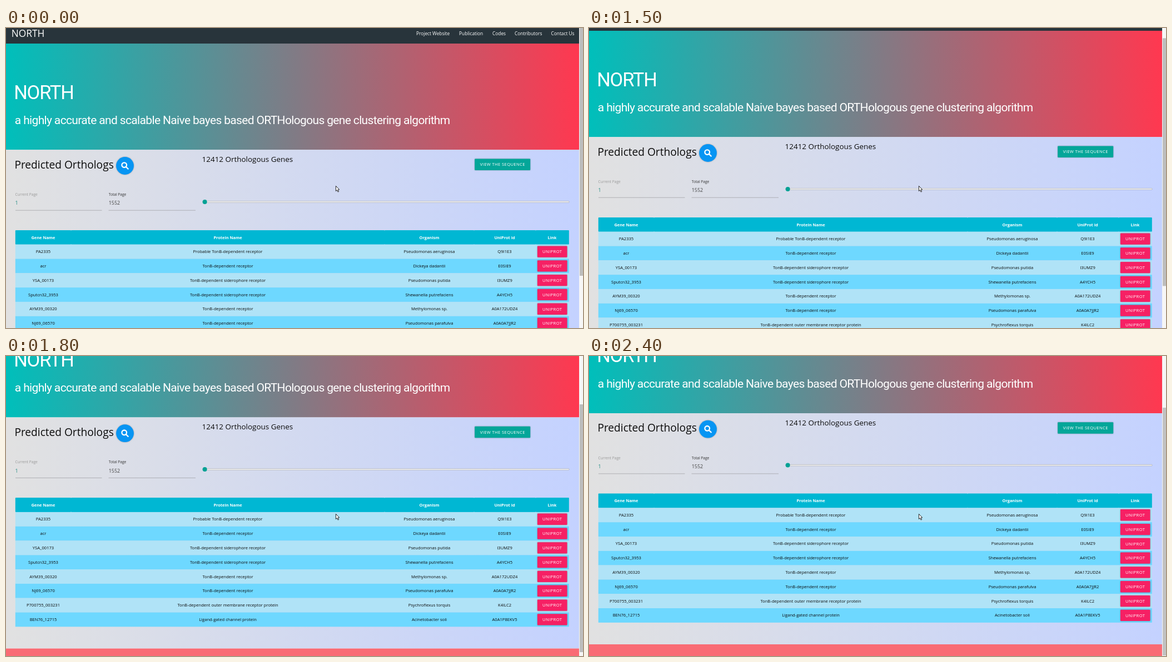
These frames come from a looping animation (1038 by 540 pixels, 2500 ms). An HTML page:

```html
<!DOCTYPE html>
<html lang="en">
<head>
<meta charset="utf-8">
<title>NORTH</title>
<style>
html, body { margin: 0; width: 100%; height: 100%; overflow: hidden; background: #fff; }
svg { display: block; width: 100%; height: 100%; font: 7.6px "Open Sans", "Noto Sans", sans-serif; fill: #0c0c0c; }
.light { fill: #fff; }
.hero { fill: #fff; font-family: Roboto, sans-serif; }
.mid { text-anchor: middle; }
.button { fill: #fff; text-anchor: middle; letter-spacing: .38px; }
.raised { filter: drop-shadow(0 .8px .8px rgba(0, 0, 0, .3)); }
</style>
</head>
<body>
<svg viewBox="0 0 1038 540" preserveAspectRatio="none">
  <defs>
    <linearGradient id="heroFill"><stop stop-color="#00bfbb"/><stop offset="1" stop-color="#ff3850"/></linearGradient>
    <linearGradient id="pageFill"><stop stop-color="#e1e1e1"/><stop offset="1" stop-color="#c4d2ff"/></linearGradient>
  </defs>
  <g id="page">
    <rect width="1031" height="28.2" fill="#28343b"/>
    <text class="light" x="9.8" y="16" font-size="17.3">NORTH</text>
    <g id="nav" class="light" font-size="8.33"></g>

    <rect y="28" width="1031" height="191.3" fill="url(#heroFill)"/>
    <text class="hero" x="14.2" y="127.5" font-size="34.5" letter-spacing="-1.2">NORTH</text>
    <text class="hero" x="15.8" y="173" font-size="21" letter-spacing="-.65">a highly accurate and scalable Naive bayes based ORTHologous gene clustering algorithm</text>

    <rect y="219.3" width="1031" height="416" fill="url(#pageFill)"/>
    <rect y="635.3" width="1031" height="22" fill="#f96b74"/>

    <text x="15.4" y="252.7" font-size="19.15">Predicted Orthologs</text>
    <circle class="raised" cx="214" cy="248" r="15.9" fill="#0795f3"/>
    <g fill="none" stroke="#fff" stroke-width="2.3">
      <circle cx="212.7" cy="246.6" r="4.3"/>
      <path d="M216 250l4.3 4.3"/>
    </g>
    <text x="352.6" y="241.3" font-size="13.45">12412 Orthologous Genes</text>
    <rect class="raised" x="843.2" y="235.6" width="100" height="20.4" rx="1" fill="#04a699"/>
    <text class="button" x="893.3" y="248.4">VIEW THE SEQUENCE</text>

    <g font-size="6.6">
      <text x="16.6" y="302.3" fill="#999">Current Page</text>
      <text x="184.8" y="302.3" fill="#333">Total Page</text>
    </g>
    <g font-size="8.9">
      <text x="16.4" y="318.4" fill="#1d8a80">1</text>
      <text x="184.8" y="318.4" fill="#444">1552</text>
    </g>
    <path d="M17 328.2H172.5M184.5 328.2H341" stroke="#9b9b9f" stroke-width=".7"/>
    <rect x="354" y="311.8" width="659" height="2.2" rx=".6" fill="#fff" stroke="#999" stroke-width=".6"/>
    <circle cx="357.6" cy="312.9" r="4" fill="#00a194"/>

    <g id="table"></g>
  </g>
  <rect x="1031" width="7" height="540" fill="#f6f6f6"/>
  <rect id="thumb" x="1032" width="6" height="446"/>
  <path d="M593.4 284.3v9.3l2.1-1.9 1.6 3.4 1.5-.7-1.6-3.3 2.7-.2z" fill="#fff" stroke="#111" stroke-width=".9"/>
</svg>
<script>
const LOOP = 2500, START = 1400, STEP = 100;
const scrolls = [10.7, 23, 34.3, 70.5, 108.8, 116.3];
const edges = [16.8, 117, 681, 842, 953, 1012.8];
const columns = [67, 399, 761.5, 897, 982.5];
const headings = ["Gene Name", "Protein Name", "Organism", "UniProt id", "Link"];
const rows = [
  ["PA2335", "Probable TonB-dependent receptor", "Pseudomonas aeruginosa", "Q9I1E3"],
  ["acr", "TonB-dependent receptor", "Dickeya dadantii", "E0SIE9"],
  ["YSA_00173", "TonB-dependent siderophore receptor", "Pseudomonas putida", "I3UMZ9"],
  ["Sputcn32_3953", "TonB-dependent siderophore receptor", "Shewanella putrefaciens", "A4YCH5"],
  ["AYM39_00320", "TonB-dependent receptor", "Methylomonas sp.", "A0A172UDZ4"],
  ["NJ69_06570", "TonB-dependent receptor", "Pseudomonas parafulva", "A0A0A7JJR2"],
  ["P700755_003231", "TonB-dependent outer membrane receptor protein", "Psychroflexus torquis", "K4ILC2"],
  ["BEN76_12715", "Ligand-gated channel protein", "Acinetobacter soli", "A0A1P8EKV5"]
];
const links = [[738, "Project Website"], [815, "Publication"], [875, "Codes"], [915, "Contributors"], [980.5, "Contact Us"]];

const $ = id => document.getElementById(id);
const label = (x, y, text, attrs = "") => `<text x="${x}" y="${y}" ${attrs}>${text}</text>`;
const box = (x, y, right, color, attrs = "") =>
  `<rect x="${x}" y="${y}" width="${right - x}" height="25.85" fill="${color}" ${attrs}/>`;

$("nav").innerHTML = links.map(([x, text]) => label(x, 12.8, text)).join("");

// Header cells have rounded corners that leave small notches between columns.
const header = headings.map((text, i) =>
  box(edges[i], 363.9, edges[i + 1], "#00b7d3", 'rx="1"') +
  label(columns[i], 379.7, text, 'class="mid light" font-size="7.4" font-weight="700"')).join("");
const body = rows.map((cells, i) => {
  const y = 389.7 + 25.8 * i;
  return box(edges[0], y, edges[5], i % 2 ? "#6ed8ff" : "#b0e3f7") +
    cells.map((text, j) => label(columns[j], y + 15.5, text, 'class="mid"')).join("") +
    `<rect class="raised" x="955.9" y="${y + 2.7}" width="53.6" height="20.3" rx="1" fill="#f62064"/>` +
    label(columns[4] + .2, y + 15.6, "UNIPROT", 'class="button"');
}).join("");
$("table").innerHTML = header + body;

function draw(now) {
  const t = now % LOOP;
  const step = Math.floor((t - START) / STEP);
  const scroll = step < 0 ? 0 : scrolls[Math.min(step, scrolls.length - 1)];
  $("page").setAttribute("transform", `translate(0 ${-scroll})`);
  $("thumb").setAttribute("y", scroll * .8);
  $("thumb").setAttribute("fill", t < 2400 ? "#bdbdbd" : "#c1c1c1");
  requestAnimationFrame(draw);
}
draw(performance.now());
</script>
</body>
</html>
```
